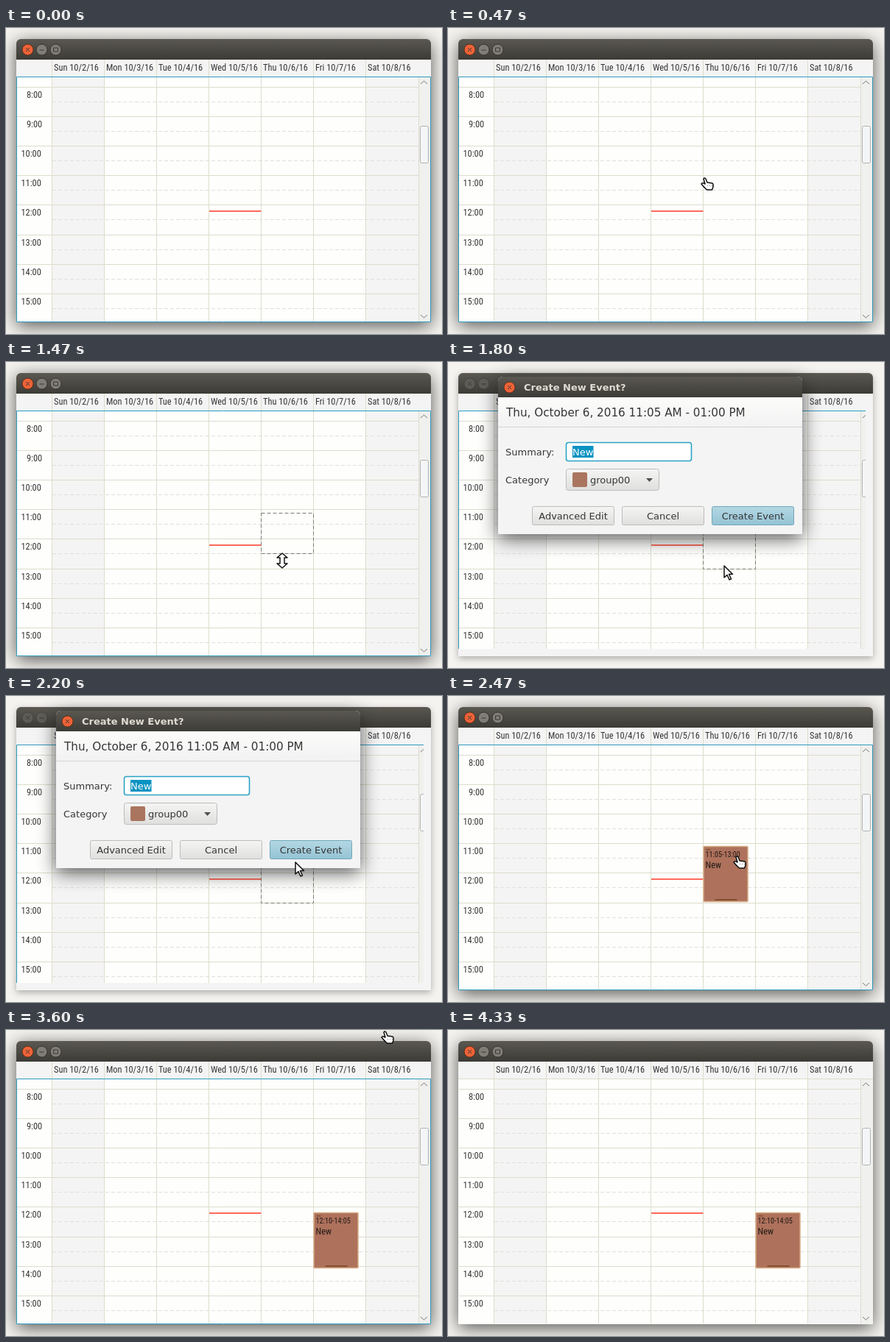
An HTML page with a canvas that plays this animation: 592 px wide and 416 px high, repeating every 4.39 s.

```html
<!DOCTYPE html>
<html lang="en">
<head>
<meta charset="utf-8">
<title>Week calendar</title>
<style>
html, body { margin: 0; width: 100%; height: 100%; overflow: hidden; background: #f4f3ef; }
canvas { display: block; }
</style>
</head>
<body>
<canvas id="stage" width="592" height="416"></canvas>
<script>
const ctx = document.getElementById('stage').getContext('2d');
const LOOP = 4390, STEP = 200 / 3;
const DAYS = ['Sun 10/2/16', 'Mon 10/3/16', 'Tue 10/4/16', 'Wed 10/5/16', 'Thu 10/6/16', 'Fri 10/7/16', 'Sat 10/8/16'];
const DESK = '#f4f3ef', WHITE = '#fefefd', PALE = '#f5f4f4', INK = '#363636';
const TEAL = '#2f9bbf', ORANGE = '#ee6238', GRID = '#dcdccc', EDGE = '#bcbcba';
const START = 11 + 5 / 60, LENGTH = 23 / 12;

const dayX = i => 62.5 + 71 * i;
const hourY = h => 80.3 + (h - 8) * 40.15;
const snap = h => Math.round(h * 12) / 12;
const clock = h => {
  const m = Math.round(h * 60);
  return Math.floor(m / 60) + ':' + String(m % 60).padStart(2, '0');
};

// Linear interpolation through [step, ...values] keys
function along(keys, k) {
  if (k <= keys[0][0]) return keys[0].slice(1);
  for (let i = 1; i < keys.length; i++) {
    const a = keys[i - 1], b = keys[i];
    if (k <= b[0]) return a.slice(1).map((v, j) => v + (b[j + 1] - v) * (k - a[0]) / (b[0] - a[0]));
  }
  return keys[keys.length - 1].slice(1);
}

const calFont = px => `condensed ${px}px "Roboto Condensed", Roboto, sans-serif`;
ctx.font = calFont(12);
const CAL = 12 * 61 / ctx.measureText(DAYS[0]).width;
const ui = (px, weight = '') => `${weight} ${px}px "DejaVu Sans", sans-serif`;

function text(str, x, y, font = calFont(CAL), color = INK, align = 'left') {
  ctx.font = font;
  ctx.fillStyle = color;
  ctx.textAlign = align;
  ctx.fillText(str, x, y);
}
function rect(x, y, w, h, fill) {
  ctx.fillStyle = fill;
  ctx.fillRect(x, y, w, h);
}
function round(x, y, w, h, r, fill, stroke, width = 1) {
  ctx.beginPath();
  ctx.roundRect(x, y, w, h, r);
  if (fill) { ctx.fillStyle = fill; ctx.fill(); }
  if (stroke) { ctx.strokeStyle = stroke; ctx.lineWidth = width; ctx.stroke(); }
}
function line(points, color, dash = [], width = 1) {
  ctx.beginPath();
  points.forEach(([x, y]) => ctx.lineTo(x, y));
  ctx.strokeStyle = color;
  ctx.lineWidth = width;
  ctx.setLineDash(dash);
  ctx.stroke();
  ctx.setLineDash([]);
}
function dashedBox(x, y, w, h) {
  line([[x, y], [x + w, y], [x + w, y + h], [x, y + h], [x, y]], '#7c7c74', [5, 3]);
}
function fade(y0, y1, a, b) {
  const g = ctx.createLinearGradient(0, y0, 0, y1);
  g.addColorStop(0, a);
  g.addColorStop(1, b);
  return g;
}
function shadow(blur, dy, color) {
  ctx.shadowBlur = blur;
  ctx.shadowOffsetY = dy;
  ctx.shadowColor = color;
}
function titleBar(x, y, w) {
  round(x, y, w, 28, [6, 6, 0, 0], fade(y, y + 28, '#5a5851', '#3c3b36'));
}
function titleButton(x, y, sign, fill, ring) {
  round(x - 7.5, y - 7.5, 15, 15, 7.5, fill, ring);
  const ink = '#3a3733';
  if (sign === 'x') {
    line([[x - 2.5, y - 2.5], [x + 2.5, y + 2.5]], ink);
    line([[x + 2.5, y - 2.5], [x - 2.5, y + 2.5]], ink);
  } else if (sign === '-') line([[x - 3, y + .5], [x + 3, y + .5]], ink);
  else round(x - 3, y - 2.5, 6, 5, 0, null, ink);
}

function drawWindow(active, focused) {
  rect(0, 0, 592, 416, DESK);
  if (active) shadow(24, 5, 'rgba(30,30,30,.75)');
  else shadow(10, 3, 'rgba(60,60,60,.4)');
  round(14, 15, 563, 385, [6, 6, 0, 0], PALE);
  shadow(0, 0, 'transparent');
  titleBar(14, 15, 563);
  if (active) {
    titleButton(29.5, 29.5, 'x', ORANGE, '#5c3018');
    titleButton(48.5, 29.5, '-', '#807d76', '#34332e');
    titleButton(67.5, 29.5, 'o', '#807d76', '#34332e');
  } else {
    titleButton(29.5, 29.5, 'x', '#5e5c56', '#454440');
    titleButton(48.5, 29.5, '-', '#5e5c56', '#454440');
  }
  rect(14, 67, 48, 332, WHITE);
  rect(134, 67, 355, 332, WHITE);

  for (let h = 8; h < 16; h++) {
    const y = Math.floor(hourY(h)) + .5, half = Math.floor(hourY(h + .5)) + .5;
    line([[15, y], [560, y]], GRID);
    line([[63, half], [560, half]], '#e0e0da', [5, 3]);
    text(clock(h), h < 10 ? 28 : 20.5, y + 14.5);
  }
  DAYS.forEach((day, i) => {
    const x = Math.floor(dayX(i)) + .5;
    line([[x, 43], [x, 399]], GRID);
    text(day, x + 2.5, 58);
  });
  line([[276, 249], [346.5, 249]], '#ff6a5a', [], 2);

  rect(560, 67, 16, 332, '#f0f0ee');
  line([[560.5, 67], [560.5, 399]], GRID);
  round(562.5, 133.5, 11, 50, 2, '#f4f5f7', '#b0b2b2');
  line([[563, 76], [567.5, 72], [572, 76]], '#777');
  line([[563, 390], [567.5, 394], [572, 390]], '#777');
  if (focused) round(14.5, 66.5, 562, 333, 0, null, TEAL);
  else line([[14, 66.5], [577, 66.5]], GRID);
  if (!active) {
    rect(567, 43, 10, 357, PALE);
    rect(14, 390, 563, 10, PALE);
  }
}

function drawEvent(day, start) {
  const x = dayX(day) + 1, y = Math.round(hourY(start)), h = 76;
  round(x - .5, y + .5, 60, h - 1, 1, '#ae715c', '#d6ac84', 1.5);
  rect(x + 3, y + 4, 6, 1.5, '#80502f');
  rect(x + 15, y + h - 4, 30, 2, '#80502f');
  text(`${clock(start)}-${clock(start + LENGTH)}`, x + 2, y + 15, calFont(CAL * .82), '#221a16');
  text('New', x + 2, y + 30, calFont(CAL), '#221a16');
}

function button(x, label, fill, border) {
  round(x + .5, 196.5, 111, 25, 2, fill, border);
  text(label, x + 56, 214, ui(13), INK, 'center');
}

function drawDialog() {
  shadow(26, 6, 'rgba(30,30,30,.75)');
  round(68, 20, 413, 214, [6, 6, 0, 0], '#f4f4f4');
  shadow(0, 0, 'transparent');
  titleBar(68, 20, 413);
  titleButton(83.5, 34.5, 'x', ORANGE, '#5c3018');
  text('Create New Event?', 103, 39, ui(13, 'bold'), '#dfdbd2');
  rect(68, 48, 413, 40, fade(48, 88, '#fcfcfb', '#f2f2f2'));
  line([[68, 88.5], [481, 88.5]], '#d4d4d2');
  text('Thu, October 6, 2016 11:05 AM - 01:00 PM', 79, 74, ui(15.2));

  text('Summary:', 78, 127, ui(13));
  round(160.5, 109.5, 170, 25, 3, '#fff', '#2aa3c6', 1.6);
  rect(169, 114, 28.5, 16, '#0a93c2');
  text('New', 169, 127, ui(13), '#fff');

  text('Category', 78, 165, ui(13));
  round(160.5, 145.5, 126, 29, 3, fade(145, 174, '#f5f5f4', '#dfdfde'), EDGE);
  round(169, 150, 20, 20, 2, '#aa755f');
  text('group00', 193, 165, ui(13));
  ctx.beginPath();
  ctx.moveTo(269, 158);
  ctx.lineTo(278, 158);
  ctx.lineTo(273.5, 163);
  ctx.fillStyle = '#505050';
  ctx.fill();

  const face = fade(196, 222, '#f5f5f4', '#dfdfde');
  button(114, 'Advanced Edit', face, EDGE);
  button(236, 'Cancel', face, EDGE);
  button(358, 'Create Event', fade(196, 222, '#b4d8e4', '#94c2d4'), '#6fa6ba');
}

const SHAPES = {
  hand: new Path2D('M-1 1Q0-1 2 1L4 6L11 7Q12.5 8 12 12L10.500 16H3.500Q-1 12-4 8Q-3 5.500 1 8Z'),
  fist: new Path2D('M-7 1Q-8-2-5-2Q-5-6-2-5Q0-8 2-5Q5-6 5-3Q8-3 7 1L5 6H-5Z'),
  resize: new Path2D('M0-10L7-4H3V4H7L0 10L-7 4H-3V-4H-7Z'),
  arrow: new Path2D('M0 0V16L4 12.500L7 19L9.500 18L6.500 11.500H11.500Z')
};
const DRAG = [[43, 397, 241], [47, 432, 274], [50, 467, 282]];
// Each leg: shape, then [step, x, y] keys
const LEGS = [
  ['hand', [2, 514, 2], [5, 385, 165], [7, 348, 204], [12, 349, 204]],
  ['resize', [13, 353, 206], [15, 360, 211], [17, 369, 221], [22, 375, 270], [24, 375, 284], [26, 375, 285]],
  ['arrow', [27, 375, 277], [30, 383, 252], [33, 393, 226], [35, 392, 218]],
  ['hand', [36, 392, 218], [38, 392, 218], [42, 392, 232]],
  ['fist', ...DRAG],
  ['hand', [51, 463, 274], [54, 514, 2]]
];
function drawCursor(k) {
  const leg = LEGS.find(([, ...keys]) => k >= keys[0][0] && k <= keys[keys.length - 1][0]);
  if (!leg) return;
  const [shape, ...keys] = leg, [x, y] = along(keys, k);
  ctx.save();
  ctx.translate(Math.round(x), Math.round(y));
  ctx.lineJoin = 'round';
  ctx.lineWidth = 1.5;
  ctx.strokeStyle = '#101010';
  ctx.fillStyle = '#fff';
  ctx.fill(SHAPES[shape]);
  ctx.stroke(SHAPES[shape]);
  if (shape === 'hand' || shape === 'fist') {
    const left = shape === 'hand' ? 4 : -3, top = shape === 'hand' ? 10 : 1;
    for (let i = 0; i < 3; i++) rect(left + 3 * i, top, 1, 1, '#808080');
  }
  ctx.restore();
}

function drawDrag(k) {
  const [x, y] = along(DRAG, k);
  const start = snap(8 + (y - 34 - 80.3) / 40.15), top = Math.round(hourY(start)) - 1.5;
  const left = Math.round(x) - 48.5;
  dashedBox(left, top, 61, 77);
  text(clock(start), left + 1, top + 1);
  text(clock(start + LENGTH), left + 1, top + 94);
}

function draw(t) {
  const k = Math.floor((t + 4) / STEP);
  const dialog = k >= 27 && k < 36;
  drawWindow(!dialog, k < 64);
  if (k >= 13 && k < 36) {
    const [end] = along([[12, START], [17, 11.4], [22, 12.5], [25, 13]], k);
    const top = Math.floor(hourY(START)) + 1.5;
    dashedBox(346.5, top, 71, Math.floor(hourY(snap(end))) + .5 - top);
  }
  if (k >= 36 && k < 51) drawEvent(4, START);
  if (k >= 51) drawEvent(5, 12 + 1 / 6);
  if (k >= 43 && k < 51) drawDrag(k);
  if (dialog) drawDialog();
  drawCursor(k);
}

const begin = performance.now();
function tick() {
  draw((performance.now() - begin) % LOOP);
  requestAnimationFrame(tick);
}
tick();
</script>
</body>
</html>
```
